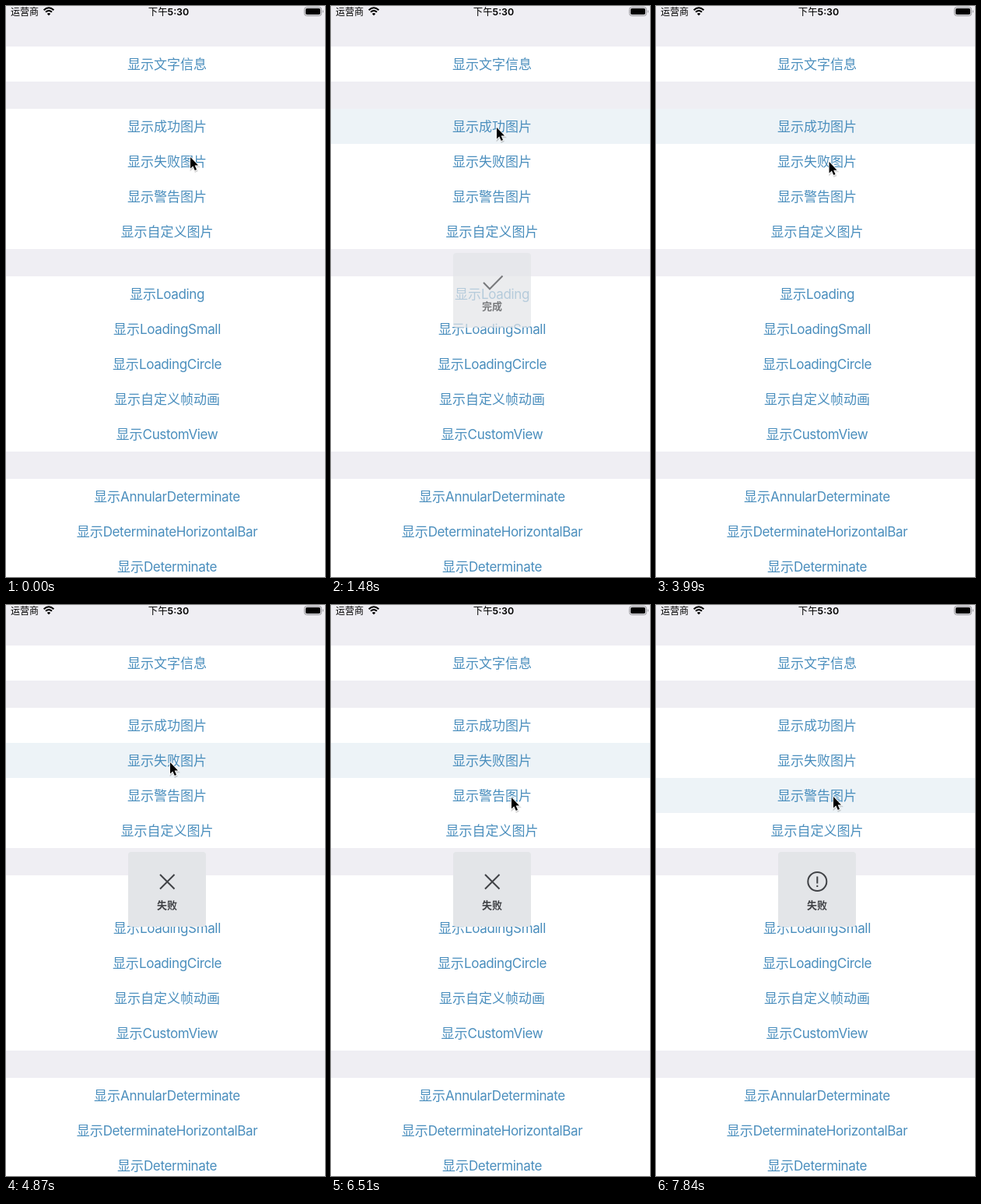
Write an HTML page that moves like this. It is 410 px wide and 733 px high and loops after 7.99 s.

```html
<!DOCTYPE html>
<html lang="zh-CN">
<head>
<meta charset="utf-8">
<title>HUD demo</title>
<style>
  html, body { margin: 0; width: 100%; height: 100%; overflow: hidden; background: #fff; }
  svg { display: block; width: 100vw; height: 100vh; }
  text { font-family: Inter, "Noto Sans CJK SC", "Noto Sans CJK", sans-serif; }
  .item { font-size: 17px; fill: #4a8ebd; text-anchor: middle; }
  .latin { letter-spacing: -.36px; }
  .status { font-size: 12px; }
  .time { font-size: 12.4px; font-weight: 500; text-anchor: middle; }
  .digits { font-weight: 600; }
  .label { font-size: 13px; font-weight: 600; fill: #404246; text-anchor: middle; }
  .icon { fill: none; stroke: #404246; stroke-width: 2; }
</style>
</head>
<body>
<svg viewBox="0 0 410 733">
  <rect width="410" height="733" fill="#efeef3"/>
  <g id="list"></g>

  <text class="status" x="6" y="11.8">运营商</text>
  <g fill="none" stroke="#000" stroke-width="2">
    <path d="M48.6 5.2Q55 -.6 61.4 5.2M51 7.8Q55 4.2 59 7.8"/>
    <path d="M55 12.2L52.8 9.9Q55 8.2 57.2 9.9Z" fill="#000" stroke="none"/>
  </g>
  <text class="time" x="209" y="11.8">下午<tspan class="digits">5:30</tspan></text>
  <rect x="383.5" y="1.5" width="22" height="11" rx="3" fill="none" stroke="#8e8e92"/>
  <rect x="385" y="3" width="19" height="8" rx="1.8"/>
  <path d="M407 5Q409 7 407 9Z" fill="#8e8e92"/>

  <g id="hud">
    <rect x="157" y="317" width="100" height="96" rx="4" fill="#e3e5e8"/>
    <path class="icon" id="icon"/>
    <text class="label" id="label" x="207" y="390"></text>
  </g>

  <g id="cursor">
    <path d="M0 0V14.5L3.3 11.4L5.8 17L8 16L5.6 10.6H10Z" transform="translate(.6 1.6)"
          fill="#000" stroke="#000" stroke-width="2" opacity=".16"/>
    <path d="M0 0V14.5L3.3 11.4L5.8 17L8 16L5.6 10.6H10Z"
          stroke="#fff" stroke-width="1.6" paint-order="stroke"/>
  </g>
</svg>
<script>
const DURATION = 7990;
const ROW = 45;
const CENTER = { x: 207, y: 365 };
const $ = id => document.getElementById(id);

const sections = [
  { y: 52, items: ['文字信息'] },
  { y: 132, items: ['成功图片', '失败图片', '警告图片', '自定义图片'] },
  { y: 347, items: ['Loading', 'LoadingSmall', 'LoadingCircle', '自定义帧动画', 'CustomView'] },
  { y: 607, items: ['AnnularDeterminate', 'DeterminateHorizontalBar', 'Determinate'] }
];

function add(tag, attrs, parent) {
  const node = document.createElementNS('http://www.w3.org/2000/svg', tag);
  for (const name in attrs) node.setAttribute(name, attrs[name]);
  return parent.appendChild(node);
}

const rows = [];
for (const { y, items } of sections) {
  items.forEach((name, i) => {
    const top = y + i * ROW;
    rows.push(add('rect', { y: top, width: 410, height: ROW, fill: '#fff' }, $('list')));
    const text = add('text', { class: 'item', x: 207, y: top + 29 }, $('list'));
    text.append('显示');
    add('tspan', { class: /[A-Z]/.test(name) ? 'latin' : '' }, text).textContent = name;
  });
}

const icons = {
  check: 'M196 355L204 363.2L220.5 346.5',
  cross: 'M198 346L216.5 364.5M216.5 346L198 364.5',
  warning: 'M195.3 355a12 12 0 1 0 24 0a12 12 0 1 0 -24 0M207.3 348.5V357.5M207.3 359.8V362'
};

// Each message fades in at its place, then grows while fading out.
const messages = [
  { icon: 'check', label: '完成', show: 1480, hide: 3400 },
  { icon: 'cross', label: '失败', show: 4720, hide: 6800 },
  { icon: 'warning', label: '失败', show: 7400, hide: Infinity }
];

const selections = [
  { at: 1180, row: 1 },
  { at: 4720, row: 2 },
  { at: 7250, row: 3 }
];

const START = [237, 194];
const moves = [
  { start: 150, end: 1180, steps: 8, via: [236, 202], to: [213, 156] },
  { start: 2220, end: 2800, steps: 5, via: [214, 180], to: [225, 200] },
  { start: 3990, end: 4430, steps: 4, via: [217, 200], to: [211, 202] },
  { start: 5020, end: 5610, steps: 5, via: [266, 232], to: [256, 253] },
  { start: 5910, end: 6510, steps: 5, via: [244, 253], to: [232, 247] },
  { start: 6800, end: 6950, steps: 2, via: [230, 247], to: [228, 246] }
];

const smooth = p => p * p * (3 - 2 * p);

function cursorAt(t) {
  let from = START;
  for (const { start, end, steps, via, to } of moves) {
    if (t < start) break;
    if (t >= end) { from = to; continue; }
    const step = Math.floor((t - start) / (end - start) * (steps - 1)) + 1;
    const p = smooth(step / steps), q = 1 - p;
    return from.map((a, i) => q * q * a + 2 * p * q * via[i] + p * p * to[i]);
  }
  return from;
}

function drawHud(t) {
  const message = messages.find(m => t >= m.show && t < m.hide + 140);
  $('hud').style.display = message ? '' : 'none';
  if (!message) return;
  const leaving = t >= message.hide;
  const entering = t < message.show + 140;
  const scale = leaving ? 1.3 : 1;
  $('hud').setAttribute('opacity', leaving ? .35 : entering ? .7 : 1);
  $('hud').setAttribute('transform',
    `translate(${CENTER.x} ${CENTER.y}) scale(${scale}) translate(${-CENTER.x} ${-CENTER.y})`);
  $('icon').setAttribute('d', icons[message.icon]);
  $('label').textContent = message.label;
}

function draw(t) {
  const selected = selections.filter(s => t >= s.at).pop();
  rows.forEach((row, i) =>
    row.setAttribute('fill', selected && selected.row === i ? '#edf3f7' : '#fff'));
  drawHud(t);
  $('cursor').setAttribute('transform', `translate(${cursorAt(t).join(' ')})`);
}

const origin = performance.now();
function tick() {
  draw((performance.now() - origin) % DURATION);
  requestAnimationFrame(tick);
}
tick();
</script>
</body>
</html>
```
